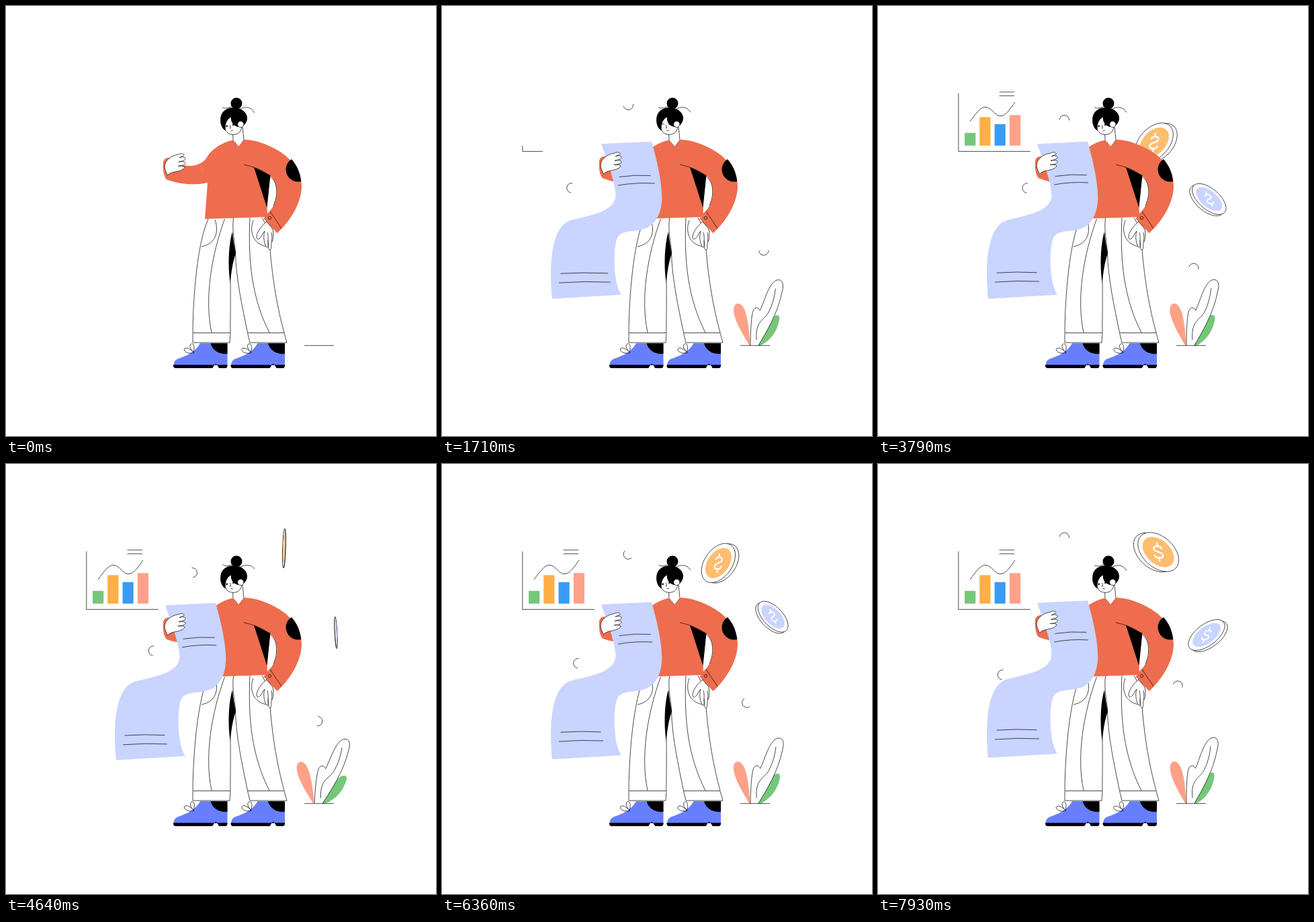
An HTML page with a canvas that plays this animation: 640 px wide and 640 px high, repeating every 8 s.

```html
<!DOCTYPE html>
<html lang="en">
<head>
<meta charset="utf-8">
<title>Report and coins</title>
<style>
html, body { margin: 0; width: 100%; height: 100%; overflow: hidden; background: #fff; }
canvas { display: block; width: 640px; height: 640px; }
</style>
</head>
<body>
<canvas id="stage"></canvas>
<script>
const LOOP = 8000;
const INK = '#111', RED = '#ed6d4e', BLUE = '#677fff', PALE = '#c9d4ff';
const SALMON = '#ffa189', GREEN = '#76c779', WHITE = '#fff';
const canvas = document.getElementById('stage');
const ctx = canvas.getContext('2d');
const dpr = window.devicePixelRatio || 1;
canvas.width = canvas.height = 640 * dpr;

const clamp = x => Math.min(1, Math.max(0, x));
const span = (t, a, b) => clamp((t - a) / (b - a));
const smooth = x => x * x * (3 - 2 * x);
const easeOut = x => 1 - Math.pow(1 - x, 3);
const back = x => x <= 0 ? 0 : 1 + 2.9 * Math.pow(x - 1, 3) + 1.9 * Math.pow(x - 1, 2);
const wave = (t, period, shift = 0) => Math.cos((t - shift) / period * Math.PI * 2);
const swayAt = t => (1 - wave(t, 2000)) / 2;

// Linear interpolation through [time, value] keys
function track(t, keys) {
  let i = 1;
  while (i < keys.length - 1 && keys[i][0] < t) i++;
  const [a, u] = keys[i - 1], [b, v] = keys[i];
  return u + (v - u) * (t - a) / (b - a);
}

function shape(d, fill, stroke, width = 0.75) {
  const p = new Path2D(d);
  if (fill) { ctx.fillStyle = fill; ctx.fill(p); }
  if (stroke) { ctx.strokeStyle = stroke; ctx.lineWidth = width; ctx.stroke(p); }
}

function line(d) { shape(d, null, INK); }

function disc(x, y, r, fill, stroke) {
  ctx.beginPath();
  ctx.arc(x, y, r, 0, Math.PI * 2);
  if (fill) { ctx.fillStyle = fill; ctx.fill(); }
  if (stroke) { ctx.strokeStyle = stroke; ctx.lineWidth = 0.75; ctx.stroke(); }
}

function around(x, y, deg, scale, draw) {
  ctx.save();
  ctx.translate(x, y);
  ctx.rotate(deg * Math.PI / 180);
  ctx.scale(scale, scale);
  ctx.translate(-x, -y);
  draw();
  ctx.restore();
}

function shifted(x, y, draw) {
  ctx.save();
  ctx.translate(x, y);
  draw();
  ctx.restore();
}

function partial(d, length, p) {
  if (p <= 0) return;
  ctx.save();
  ctx.setLineDash([length * p, length * 2]);
  line(d);
  ctx.restore();
}

const BOB = [[0, 2.8], [0.355, 6], [0.53, 8.2], [0.785, 3], [0.87, 0.4], [1, 2.8]];
const bobAt = t => track(t / 2000 % 1, BOB);

function chart(t) {
  const h = smooth(span(t, 1430, 2230)), v = smooth(span(t, 1550, 2370));
  if (h > 0) line(`M119.8 ${216.4 - 86.4 * v}V216.4H${119.8 + 107 * h}`);
  const bars = [[129, 19, GREEN], [151.2, 42.4, '#ffaf45'], [173.5, 32, '#3a9bf4'], [195.8, 45.5, SALMON]];
  bars.forEach(([x, full, color], i) => {
    const height = full * back(span(t, 2234 + 112 * i, 2934 + 112 * i));
    ctx.fillStyle = color;
    ctx.fillRect(x, 207.8 - height, 16.2, height);
  });
  partial('M137 172C146 160 152 150.5 160 150.5C169 150.5 174 163.8 182 163.8C190 163.8 197 153 204 143',
    95, smooth(span(t, 2000, 3100)));
  const legend = 22.5 * smooth(span(t, 2800, 3250));
  if (legend > 0) line(`M180.5 128h${legend}M180.5 133.7h${legend}`);
}

function arc(x, y, deg, size) {
  const mid = deg * Math.PI / 180;
  ctx.beginPath();
  ctx.arc(x, y, 7.2 * size, mid - Math.PI / 2, mid + Math.PI / 2);
  ctx.strokeStyle = INK;
  ctx.lineWidth = 0.75;
  ctx.stroke();
}

function arcs(t) {
  const size = easeOut(span(t, 500, 850));
  if (size <= 0) return;
  const turn = track(t, [[0, -83], [4000, 294], [5570, 442], [7070, 546], [8000, 645]]);
  arc(277.3, track(t, [[0, 129], [4000, 172], [8000, 108.2]]), turn, size);
  arc(track(t, [[0, 169], [4000, 225], [5570, 211.5], [8000, 184.5]]),
    track(t, [[0, 270.5], [4000, 271], [8000, 314.5]]), 187, size);
  arc(track(t, [[0, 482], [2700, 477], [4000, 468.5], [5570, 456.5], [7070, 451.5], [8000, 445.5]]),
    track(t, [[0, 342], [4000, 393], [8000, 329]]), turn + 11, size);
}

function plant(t) {
  const size = back(span(t, 100, 800));
  const sway = swayAt(t);
  if (size <= 0) return;
  around(458, 505, -3 * sway, size, () => shape(
    'M457.5 505.5C449 490 436 470 434.7 454C434.3 447 437 442.5 441.5 442.7C454 444 457 475 459 505.5Z', SALMON));
  around(472, 505, 13.5 * sway, size, () => shape(
    'M470.5 505.5C480 486 485 459 497 459C502 459.5 501 466 498 476C494 489 485 499 474 505.5Z', GREEN));
  around(464, 505, 4.8 * sway, size, () => {
    shape('M459 505C459 492 459 462 462.5 453C465 447.5 470 448 472.5 453C479 439 485 411 497 407.3C506 405 507.5 415 505 424C499 457 483 484 471 505', WHITE, INK);
    line('M468 497C465 467 480 468 486 454C491 444 494 432 495 420');
  });
}

function ellipse(x, y, r, a, b, fill, stroke) {
  ctx.save();
  ctx.transform(a, 0, b, 1, x, y);
  ctx.beginPath();
  ctx.arc(0, 0, r, 0, Math.PI * 2);
  ctx.restore();
  ctx.fillStyle = fill;
  ctx.fill();
  if (stroke) { ctx.strokeStyle = stroke; ctx.lineWidth = 0.75; ctx.stroke(); }
}

// A slanted coin that flips by changing its horizontal scale
function coin(t, o) {
  const size = easeOut(span(t, 2950, 3350));
  if (size <= 0) return;
  const y = o.mid - o.amp * wave(t, 4000, o.top) + o.rise * (1 - smooth(span(t, 3000, 4500)));
  const turn = wave(t, LOOP / 3);
  const flip = 1.22 * turn - 0.22 * turn ** 3;
  ctx.save();
  ctx.translate(o.x, y);
  ctx.scale(size, size);
  const rim = o.rim * flip, a = 0.96 * flip, b = o.slant * flip;
  ellipse(-rim, o.drop, o.r, a, b, WHITE, INK);
  ellipse(rim, -o.drop, o.r, a, b, WHITE, INK);
  ellipse(rim, -o.drop, o.r * 0.77, a, b, o.color);
  ctx.transform(flip, 0, o.lean * flip, 1, rim, -o.drop);
  ctx.scale(o.r / 29, o.r / 29);
  ctx.lineCap = 'round';
  shape('M5.5 -5.5C3.5 -10 -6 -9.8 -6 -4.5C-6 1 6.3 -1 6.3 4.8C6.3 10 -4 10.3 -6 5.5M0 -13.2V-8.5M0 8.5V13.2', null, WHITE, 2.4);
  ctx.restore();
}

function shoe() {
  shape('M250 535C249 530 252 527 256 525C268 521 282 515 289 502H329.5V535Z', BLUE);
  shape('M304.5 502H329.5V517.5C317 519 307 512 304.5 502Z', '#000');
  shape('M249 534H329.5V536C329 538 328 539 327 539H318C315.5 539 315.5 533 312 532.5C309 533 309 539 306.5 539H252C249 538.5 249 536 249 534Z', '#000');
}

function laces(t) {
  around(280, 515, 4 * swayAt(t), 1, () => {
    line('M280 516C275 511 267 506 265 511.5C267 517 274 517.5 280 516Z');
    line('M279 515C274 511 272.5 505 275.5 503C279 501.5 281.5 506 279 515Z');
  });
}

function legs(t) {
  for (const x of [0, 85.5]) shifted(x, 0, () => { shoe(); laces(t); });
  shape('M301 317C285 352 278.5 430 278 486H334C334 440 335 400 337 360L338 315Z', WHITE);
  shape('M338 315C335 340 341 358 341.5 367C344 410 353 450 359.5 486H414C404 450 398 410 393 358L386 315Z', WHITE);
  line('M301 317C285 352 278.5 430 278 486M333.8 486C334.2 450 334.2 430 334 410');
  line('M338.5 315C336 337 341 352 341.5 367C342 404 352 450 359.5 486M393 362C397 410 404 450 414 486');
  line('M325.5 317C306 370 295 435 306 486M363 315C360 380 366 435 392 486');
  line('M311 318C317 335 313 354 291 358M368 319C361 338 370 356 389 358M381 315L386 324');
  shape('M337 336C331 355 330 390 334 413C335 395 338 380 342 368C340 358 338 348 337 336Z', '#000');
  shape('M278 486.5H334L333 501H278Z', WHITE, INK);
  shape('M359.5 486.5H414L418 501H363Z', WHITE, INK);
}

function sweater(d) {
  shape(`M338 199.5C322 203 308 212 301 222C297 229 293 233 288 234.5C281 238.5 273 239 262 ${236 + d}L244 ${225.5 + d}`
    + `C239 ${225 + d} 235 ${227 + d} 234 ${232 + d}C233 ${243 + d} 235 ${254 + d} 239 ${258 + d}`
    + `C258 ${265 + d} 280 267.5 300 263L296 317L389 314L403.5 338C426 318 440 290 440 268`
    + 'C440 248 428 230 408 217C390 206 372 199 354 199L346 209Z', RED);
  line('M338 199.5L346.5 209L354 199');
  shape('M288 234L293 247', null, '#f38d72', 0.6);
  shape('M369 240L393.5 252L389 302Z', '#000');
  shape('M393.5 252.5C403 261 405 276 402 287C399 298 394 304 389 309L388.5 300Z', WHITE);
  line('M354 236C372 240 393 248 400.5 263C405 276 402 288 398 297');
  shape('M425 228A18.2 18.2 0 0 0 439.3 261C438 248 433 237 425 228Z', '#000');
  shape('M391 307L383.5 316.5L403.5 338L410 331L393 305.5Z', RED);
  line('M393 305.5L410 331');
  disc(392.5, 315.5, 2.2, null, INK);
}

function hipHand() {
  shape('M388 321C380 327 373 337 373 344C374 350 379 346 382 339L385 335C382 344 385 356 388 359C391 360 391 354 390 349C390 356 390 363 393 363C396 362 394 356 395.5 351C398 349 397.5 343 398 338L397 332Z', WHITE, INK);
  line('M390 349C390.5 344 390 340 389 337M395.5 351C396 345 396 341 395 337');
}

function head(t) {
  const lift = wave(t, 2000);
  shape('M337.5 188L338 199.5L346.5 209L354 199L352 179Z', WHITE);
  line('M337.5 189L338 199.5M352 180L354 199');
  shape('M328 186C320 183 317.5 172 320 163C323 154 333 150.5 341 151C352 152 359.5 160 359 168C358 175 354 178 350 180Z', '#000');
  disc(343, 145, 8.5, '#000');
  shape('M327 185C325.5 176 329 168 335 165.5C334 172 338 178.5 346 180L351 180C349 188 344 191 339 191C333 191 329 189 327 185Z', WHITE);
  line('M327 185C329 189 333 191.3 339 191.3C345 191 349.5 188 351 180');
  disc(349.3, 176, 4.6, WHITE, INK);
  if (t > 1620 && t < 1800) {
    line('M327 176.5Q329 174.5 331 175.5M336.5 175.5L340 177');
  } else {
    disc(328.7, 178.7, 1.3, '#000');
    disc(338.3, 176.7, 1.3, '#000');
  }
  line('M333.5 177C333.5 179 335 181 334 182L332.5 181.5M334.5 185.5Q336.5 186.5 338 184.5');
  line(`M322 ${150 + lift}C326 153 332 152 337 149M349 153C356 150 364 149 370 ${157 + 2 * lift}`);
}

// The printed lines sway a little more than the sheet itself
function rules(t) {
  const grow = smooth(span(t, 900, 1550));
  const extra = 11 * (1 - smooth(span(t, 1680, 2000)));
  if (grow <= 0) return;
  const rule = (x, y, w, rise) =>
    line(`M${x} ${y}Q${x + w * grow / 2} ${y - rise - 1.7} ${x + w * grow} ${y - rise}`);
  shifted(0, 11.3 * swayAt(t), () => {
    rule(263.5, 252.3, 47, 2);
    rule(262, 264.8, 51 + extra / 3, 3);
    rule(176.5, 396, 60 + extra, 0.4);
    rule(174, 409.8, 66 + extra, 1);
  });
}

function paper(t, d) {
  const size = easeOut(span(t, 70, 760));
  if (size <= 0) return;
  around(262, 232 + d, 0, size, () => {
    shifted(0, d, () => shape('M237 204.5L312 201C317 219 327 255 327.3 284C327 307 319 325 301 331C285 336 268 332 261 344C254 359 255 413 267 429L164 435C159 381 163 327 192 318C219 311 258 306 258.5 281C258 262 246 231 237 204.5Z', PALE));
    rules(t);
  });
}

function frontHand(d) {
  shifted(0, d, () => {
    shape('M240.5 252C238 246 234.5 241 237 234C240 227 248 222 256 221C260 219 264 219 265 221.5C265 223 260 224.5 258 225.5C262 224 267 224 267 227C267 230 260 231 257 232C262 231 267 231 267 234C266 237 260 238 256 238C260 238 266 237.5 266 240C264 244 256 246 250 247C246 248 243 249 240.5 252Z', WHITE, INK);
  });
}

function render(t) {
  ctx.setTransform(dpr, 0, 0, dpr, 0, 0);
  ctx.fillStyle = WHITE;
  ctx.fillRect(0, 0, 640, 640);
  const bob = bobAt(t), arm = bob - 2.6;
  chart(t);
  arcs(t);
  coin(t, { x: 414, mid: 137, amp: 11.5, top: 4600, rise: 152, r: 29.2, rim: 3.2, drop: 0.3, slant: 0.43, lean: 0.15, color: '#ffbd70' });
  coin(t, { x: 491, mid: 241.5, amp: 14.5, top: 6100, rise: 74, r: 23, rim: -2, drop: 1, slant: -0.7, lean: -0.5, color: PALE });
  plant(t);
  line('M444 505.3H488');
  legs(t);
  sweater(arm);
  hipHand();
  head(t);
  paper(t, bob);
  frontHand(arm);
}

let start = null;
function tick(now) {
  if (start === null) start = now;
  render((now - start) % LOOP);
  requestAnimationFrame(tick);
}
render(0);
requestAnimationFrame(tick);
</script>
</body>
</html>
```
